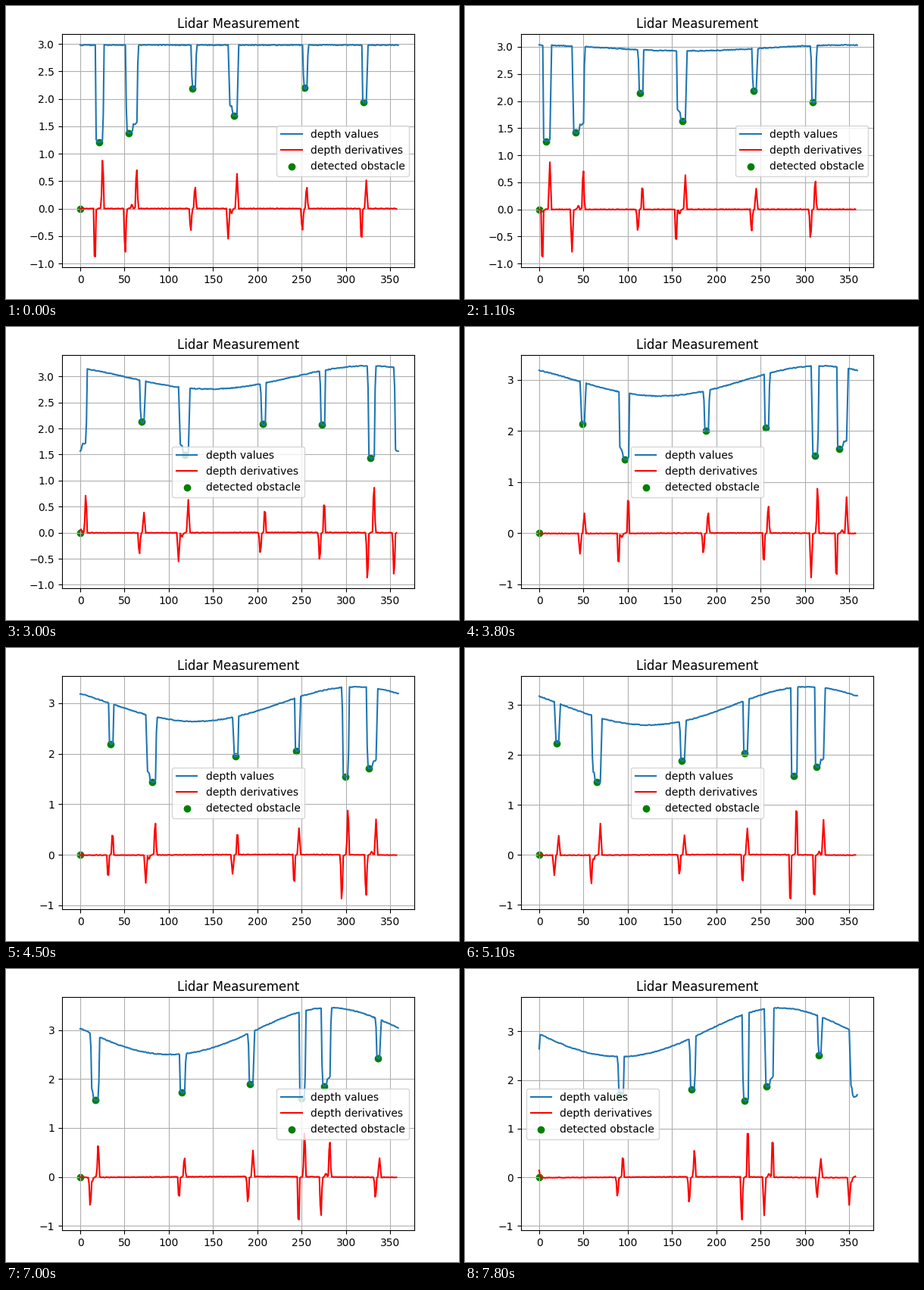
Recreate the animation shown at these times as a matplotlib script. Size 598 px wide and 387 px high, loop 8000 ms.

```python
import numpy as np
import matplotlib.pyplot as plt
from matplotlib.animation import FuncAnimation

W, H, DPI = 598, 387, 100
FRAMES, INTERVAL = 80, 100

# First and last animation frame of every burst of new scans.
BURSTS = [(6, 8), (10, 12), (14, 17), (19, 23), (25, 28), (30, 32), (34, 38),
          (40, 41), (43, 49), (51, 52), (54, 58), (60, 66), (68, 72), (74, 78)]

# The robot turns on a small circle inside a round room with round posts.
# Places are complex numbers, measured from the centre of the room.
ROOM_RADIUS = 2.98
POST_RADIUS = 0.1
TRACK = 0.253 * np.exp(1j * np.radians(82))
TURN = ([0, 11, 20, 37, 53, 60], [0, 26.8, 52.3, 98.2, 141.6, 162.2])
FRONT_POSTS = [1.215 + 0.487j, 0.835 + 1.222j, -1.41 + 1.795j,
               -1.775 + 0.16j, -0.62 - 2.2j, 1.58 - 1.27j]
REAR_POSTS = [0.79 + 1.435j, -1.936 + 0.31j]

# The legend moves to the emptiest place from these scans on.
LEGEND_PLACES = [(0, "center right"), (9, "lower left"), (17, "center"),
                 (51, "center right"), (58, "center left")]

angles = np.arange(360)
# four rays per degree, averaged to soften the edges
rays = angles[:, None] + (np.arange(4) - 1.5) / 4


def scan_number(frame):
    return sum(min(max(frame - a + 1, 0), b - a + 1) for a, b in BURSTS)


def robot_pose(scan):
    turn = np.interp(scan, *TURN)
    return TRACK * (np.exp(1j * np.radians(turn)) - 1), turn


def cast(robot, turn):
    """Distance along every ray to the nearest post or the wall."""
    direction = np.exp(1j * np.radians(rays + turn))
    wall = -robot / direction
    depth = wall.real + np.sqrt(ROOM_RADIUS**2 - wall.imag**2)
    for post in FRONT_POSTS + REAR_POSTS:
        rel = (post - robot) / direction
        inside = POST_RADIUS**2 - rel.imag**2
        hit = (inside > 0) & (rel.real > 0)
        surface = rel.real - np.sqrt(np.maximum(inside, 0))
        depth = np.where(hit, np.minimum(depth, surface), depth)
    return depth.mean(axis=1)


def detect(robot, turn, depth):
    """Points on the posts that lie fully within one sweep."""
    points = [(0, 0)]
    for post in FRONT_POSTS:
        rel = post - robot
        bearing = (np.degrees(np.angle(rel)) - turn) % 360
        half = np.degrees(np.arcsin(POST_RADIUS / abs(rel)))
        if half < bearing < 359 - half:
            x = int(round(bearing - 1))
            points.append((x, depth[x]))
    return points


plt.rcParams["text.kerning_factor"] = 6
fig = plt.figure(figsize=(W / DPI, H / DPI), dpi=DPI, facecolor="white")
ax = fig.add_axes([74 / W, 42 / H, 465 / W, 308 / H])
ax.set_title("Lidar Measurement")
ax.grid(True)
ax.set_xlim(-20.53, 377.2)

depth_line, = ax.plot([], [], color="#1f77b4", label="depth values")
slope_line, = ax.plot([], [], color="red", label="depth derivatives")
dots = ax.scatter([0], [0], color="green", label="detected obstacle")
legend = ax.legend(loc="center right")


def draw(frame):
    scan = scan_number(frame)
    robot, turn = robot_pose(scan)
    noise = np.random.default_rng(scan).uniform(-0.008, 0.008, angles.size)
    depth = cast(robot, turn) + noise
    slope = (depth[2:] - depth[:-2]) / 2

    depth_line.set_data(angles, depth)
    slope_line.set_data(angles[:-2], slope)
    dots.set_offsets(detect(robot, turn, depth))

    low, high = slope.min(), depth.max()
    margin = 0.05 * (high - low)
    ax.set_ylim(low - margin, high + margin)
    legend.set_loc([place for first, place in LEGEND_PLACES if first <= scan][-1])
    return depth_line, slope_line, dots, legend


anim = FuncAnimation(fig, draw, frames=FRAMES, interval=INTERVAL,
                     init_func=lambda: draw(0), repeat=True, repeat_delay=0)
plt.show()
```
